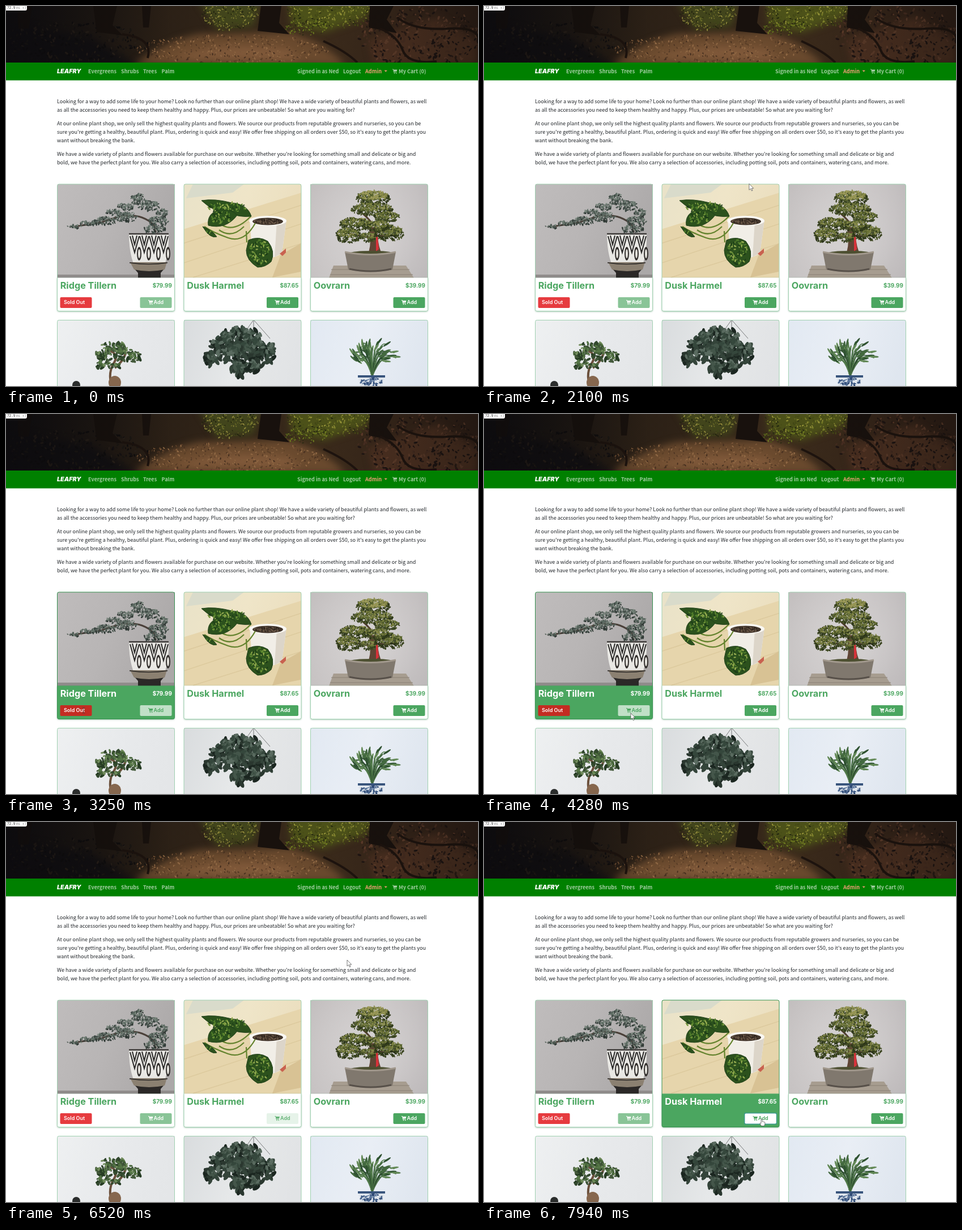
Write an HTML page with a canvas that moves like this. It is 833 px wide and 672 px high and loops after 8 s.

```html
<!DOCTYPE html>
<html lang="en">
<head>
<meta charset="utf-8">
<title>Plant shop</title>
<style>
html, body { margin: 0; width: 100%; height: 100%; overflow: hidden; background: #fff; }
canvas, svg { position: absolute; left: 0; top: 0; width: 833px; height: 672px; }
text { white-space: pre; }
.body, .nav { font: 9.08px "Noto Sans CJK SC", "Noto Sans CJK JP", "Noto Sans CJK KR", "Noto Sans CJK TC", "Noto Sans", sans-serif; fill: #212529; }
.nav { font-weight: 700; fill: #a3cfa3; }
.admin { fill: #f29d78; }
.brand { font: italic 900 10.7px Inter, sans-serif; fill: #fff; }
.badge { font: 6px "DejaVu Sans Mono", monospace; fill: #333; }
.title, .price, .btn { font-family: Inter, "Open Sans", sans-serif; font-weight: 700; }
.title { font-size: 16.2px; }
.price { font-size: 9.8px; text-anchor: end; }
.btn { font-size: 9px; font-weight: 600; }
.title, .price { fill: #4ba660; }
.panel { fill: #fff; }
.frame { fill: none; stroke: #9fd0b0; }
.sold { fill: #e63b3f; }
.on .title, .on .price { fill: #fff; }
.on .panel { fill: #4ba660; }
.on .frame { stroke: #35914f; }
.on .sold { fill: #c32c22; }
.off { opacity: .65; }
.shade { filter: drop-shadow(0 1.5px 1.5px rgba(60, 130, 85, .55)); }
</style>
</head>
<body>
<canvas id="photos" width="833" height="672"></canvas>
<svg id="page" viewBox="0 0 833 672"></svg>
<script>
const ctx = document.getElementById('photos').getContext('2d');
const page = document.getElementById('page');
const TAU = Math.PI * 2;
const CARD_X = [90.5, 314, 537.5];

// ---------- photos ----------
let seed = 7;
const rnd = () => (seed = (seed * 16807) % 2147483647) / 2147483647;
const span = (a, b) => a + (b - a) * rnd();
const pick = list => list[Math.floor(rnd() * list.length)];

function oval(x, y, rx, ry, color, turn = 0) {
  ctx.fillStyle = color;
  ctx.beginPath();
  ctx.ellipse(x, y, rx, ry, turn, 0, TAU);
  ctx.fill();
}
function shape(d, color, stroke, width = 1) {
  const p = new Path2D(d);
  if (color) { ctx.fillStyle = color; ctx.fill(p); }
  if (stroke) { ctx.strokeStyle = stroke; ctx.lineWidth = width; ctx.stroke(p); }
}
function leaves(x, y, rx, ry, n, size, colors) {
  for (let i = 0; i < n; i++) {
    const a = rnd() * TAU, r = Math.sqrt(rnd());
    const s = size * span(.6, 1.2);
    oval(x + Math.cos(a) * r * rx, y + Math.sin(a) * r * ry, s, s * .5, pick(colors), rnd() * 3);
  }
}
// Foliage tier, dark below and lit from above
function tier(x, y, rx, ry, density, size, dark, light) {
  leaves(x, y + ry * .15, rx, ry, rx * ry * density, size, dark);
  leaves(x, y - ry * .25, rx * .9, ry * .65, rx * ry * density * .6, size * .8, light);
}
function photo(x, y, w, h, stops, draw) {
  ctx.save();
  ctx.beginPath();
  ctx.rect(x, y, w, h);
  ctx.clip();
  const g = ctx.createLinearGradient(x, y, x + w, y + h * .5);
  stops.forEach((c, i) => g.addColorStop(i / (stops.length - 1), c));
  ctx.fillStyle = g;
  ctx.fillRect(x, y, w, h);
  draw();
  ctx.restore();
}

function forest() {
  ctx.filter = 'blur(7px)';
  shape('M225 105Q270 66 340 50L500 46Q560 62 600 105Z', '#6a4a2e');
  shape('M290 92Q380 62 500 76L520 96Z', '#80593a');
  shape('M340 -10H450L436 36L372 40Z', '#42451c');
  shape('M500 -10H660L630 22L560 46L505 34Z', '#4c5119');
  shape('M640 60L760 20L833 60V105H650Z', '#4a2f20');
  shape('M0 30L150 56L232 105H0Z', '#121013');
  ctx.filter = 'none';
  leaves(395, 14, 50, 30, 260, 2, ['#6a6c28', '#3f451a', '#8b853a', '#23240f']);
  leaves(575, 8, 80, 32, 380, 2, ['#6f7524', '#454a16', '#959339', '#282c10']);
  leaves(530, 38, 40, 14, 100, 2, ['#6d7a20', '#4a5319', '#2f2c15']);
  leaves(400, 76, 170, 26, 420, 2, ['#7a5638', '#5a3e27', '#8f6844', '#473020']);
  leaves(115, 66, 135, 38, 260, 3, ['#1c1814', '#0f0d0e', '#2b221b', '#161213']);
  leaves(730, 55, 110, 54, 420, 3, ['#452c20', '#291b15', '#5a3a29', '#1d1412']);
  shape('M154 0H196L188 34L206 52L160 46Z M450 0H486L482 30L500 50L444 44Z M642 0H684L672 24L690 48L640 38Z M20 0H46L40 40H22Z M240 0H256L252 38H242Z', '#18110d');
  shape('M205 50Q260 56 250 92 M660 40Q690 52 700 78T760 98 M690 20Q720 44 780 40T833 66 M560 62Q600 80 620 100', null, '#1d130e', 4);
  const g = ctx.createLinearGradient(0, 0, 833, 0);
  g.addColorStop(0, 'rgba(10,9,12,.65)');
  g.addColorStop(.35, 'rgba(10,9,7,0)');
  g.addColorStop(.75, 'rgba(10,9,7,0)');
  g.addColorStop(1, 'rgba(10,9,7,.3)');
  ctx.fillStyle = g;
  ctx.fillRect(0, 0, 833, 100);
}

function juniper() {
  shape('M90 475H298V481H90Z', '#908c8b');
  shape('M226 464H280L273 472V481H233V472Z', '#2b2827');
  shape('M217 402H287Q288 434 280 458Q252 468 226 458Q217 436 217 402Z', '#e9e8e4');
  shape('M219 453H284L280 466Q252 472 226 466Z', '#8b8071');
  shape('M218 454Q252 459 285 454', null, '#2d2a28', 1.5);
  for (let x = 219; x < 285; x += 17) {
    shape(`M${x} 407L${x + 8} 436L${x + 16} 407M${x + 4} 406L${x + 8} 422L${x + 12} 406`, null, '#2b2a29', 2);
    oval(x + 16, 438, 4, 12, '#33302e');
    oval(x + 16, 438, 2, 8, '#e5e3dd');
  }
  shape('M217 403H287', null, '#3a3735', 2.5);
  shape('M264 401Q266 384 240 374T170 382L116 391', null, '#4a4039', 3);
  const dark = ['#3d4843', '#515d56', '#2d3632'], light = ['#68766d', '#57665d', '#7d8a80'];
  [[122, 390, 14, 3], [148, 384, 18, 5], [176, 379, 20, 7], [190, 364, 13, 6], [212, 372, 20, 9], [212, 354, 16, 6], [232, 340, 13, 10], [252, 352, 19, 9], [276, 366, 11, 9], [268, 380, 18, 9], [262, 394, 20, 6]]
    .forEach(t => tier(...t, .38, 2.4, dark, light));
}

function vine() {
  shape('M312 395L522 330V480H312Z', '#e6d5ac');
  shape('M312 420L522 352M312 455L522 385M330 480L522 420', null, '#dcc99d', 1.5);
  shape('M330 315H420L400 330L318 340Z', '#d9dbcb');
  shape('M485 440L520 420V470L470 480Z', '#d8c294');
  shape('M430 376L495 378L487 437Q470 450 446 444L434 432Z', '#f1eee7');
  shape('M478 380L495 378L487 437L474 444Z', '#dcd5c9');
  oval(462, 380, 33, 9, '#faf8f3');
  oval(462, 381, 27, 6.5, '#43362c');
  leaves(462, 381, 24, 4, 50, 2, ['#2d231c', '#6d5a49']);
  shape('M494 429L483 438L488 442L494 436Z', '#c9614f');
  shape('M440 384Q420 420 392 410T350 390M420 390Q398 412 376 396M424 398L425 418M432 372Q405 400 382 388', null, '#64832e', 2.2);
  const blades = [
    ['M345 344Q368 340 398 348Q426 350 433 372Q410 374 394 366Q368 366 345 344Z', 390, 356, 34, 9],
    ['M357 388Q354 366 378 360Q400 360 408 370Q388 396 357 388Z', 380, 374, 18, 11],
    ['M428 414Q446 406 462 416Q476 434 468 452Q458 462 444 462Q424 450 424 432Z', 447, 436, 18, 22],
    ['M347 390Q364 396 372 408Q360 412 347 390Z', 360, 400, 6, 4]
  ];
  for (const [d, x, y, rx, ry] of blades) {
    shape(d, '#2c511d', '#20401a');
    leaves(x, y, rx, ry, rx * ry * .2, 2.4, ['#6f9438', '#4f7c2a', '#1c3c17', '#93a94f']);
  }
}

function bonsai() {
  const g = ctx.createRadialGradient(640, 400, 30, 640, 400, 130);
  g.addColorStop(0, 'rgba(214,211,211,.8)');
  g.addColorStop(1, 'rgba(214,211,211,0)');
  ctx.fillStyle = g;
  ctx.fillRect(537, 315, 208, 166);
  shape('M578 459H706L720 481H570Z', '#a79d90');
  shape('M574 466H712M572 475H718', null, '#8a8074');
  shape('M640 436Q646 414 640 392L656 390Q654 415 662 436Z', '#5f4535');
  shape('M646 410Q620 406 604 402M652 406Q676 408 690 404M646 384Q636 372 628 366', null, '#4d3a2c', 3);
  const dark = ['#39431f', '#4a5529', '#2b3419'], light = ['#737b3c', '#5d6932', '#8b8d4c'];
  [[648, 338, 30, 12], [646, 358, 37, 11], [672, 372, 22, 9], [616, 384, 28, 11], [604, 404, 22, 13], [640, 408, 16, 8], [676, 400, 26, 14], [654, 388, 24, 10]]
    .forEach(t => tier(...t, .6, 2.4, dark, light));
  leaves(648, 334, 26, 8, 90, 2, ['#a09d5c', '#8a8b4c']);
  shape('M653 409L656 408L658 430L653 434Z', '#d8323a');
  oval(645, 437, 38, 4, '#4c4f30');
  shape('M598 435Q644 444 688 435L682 466Q644 474 604 466Z', '#80786e');
  shape('M598 435Q644 444 688 435', null, '#a0978b', 3);
  shape('M606 465Q644 473 680 465', null, '#575049', 3);
}

function ficus() {
  shape('M186 672Q180 648 190 632T184 610M192 640Q206 630 212 612', null, '#6b503c', 4);
  oval(192, 666, 11, 12, '#86674e');
  const dark = ['#33492e', '#263c23', '#43593a'], light = ['#557546', '#466539', '#728d5c'];
  [[190, 604, 24, 11], [172, 618, 16, 10], [206, 614, 18, 12], [226, 620, 13, 10], [180, 634, 24, 7]]
    .forEach(t => tier(...t, .13, 4.4, dark, light));
  oval(124, 670, 7, 7, '#2b2d2c');
}

function hanging() {
  shape('M437 555L412 590M437 555V600M437 555L466 588', null, '#77797a');
  const dark = ['#2a372f', '#1b2620', '#34443a'], light = ['#44564a', '#35473c', '#5a6b60'];
  [[415, 584, 38, 18], [380, 596, 20, 14], [364, 620, 13, 15], [402, 612, 26, 16], [436, 606, 22, 18], [462, 612, 13, 18], [412, 640, 16, 15], [438, 636, 14, 12]]
    .forEach(t => tier(...t, .11, 6.5, dark, light));
}

function palm() {
  for (let i = 0; i < 46; i++) {
    const a = span(-2.9, -.25), r = span(22, 47);
    const x = 648 + Math.cos(a) * r, y = 630 + Math.sin(a) * r;
    shape(`M646 656Q${648 + Math.cos(a) * r * .4} ${y - 6} ${x} ${y + 7}`, null, pick(['#3a6138', '#29482c', '#527a4b']), 1.4);
    oval(x, y + 5, 8, 1.7, pick(['#43693f', '#2f5231', '#638956']), a + .4);
  }
  shape('M621 654H669L664 673H626Z', '#dfe5ec');
  shape('M621 655H669', null, '#39557d', 4);
  leaves(645, 665, 20, 7, 60, 2.4, ['#48658f', '#2f4a75', '#7f96b5']);
}

photo(0, 0, 833, 100, ['#121012', '#2b2016', '#3a2a1b', '#2e1e16'], forest);
photo(91, 315, 207, 166, ['#bfbcbc', '#b8b5b5', '#aba8a8'], juniper);
photo(314, 315, 207, 166, ['#e9e2c8', '#efe5c8', '#eaddbd'], vine);
photo(537, 315, 207, 166, ['#c2bebe', '#c8c4c4', '#bdb9ba'], bonsai);
photo(91, 555, 207, 117, ['#eef0f1', '#e8eaec', '#e4e6e8'], ficus);
photo(314, 555, 207, 117, ['#d9dcde', '#e6e8e9', '#e1e3e5'], hanging);
photo(537, 555, 207, 117, ['#e2e9f2', '#e9eef5', '#dfe6ef'], palm);

// ---------- page ----------
const text = (cls, x, y, s) => `<text class="${cls}" x="${x}" y="${y}">${s}</text>`;
const rect = (cls, x, y, w, h, r = 0, more = '') => `<rect class="${cls}" x="${x}" y="${y}" width="${w}" height="${h}" rx="${r}" ${more}/>`;
const cart = (x, y) => `<path transform="translate(${x} ${y})" d="M0 0H1.7L2.1 1H8.4L7.5 4.6H3L3.2 5.4H7.3V6.2H2.4L1.2 .9H0ZM3.4 6.5a.8.8 0 1 0 .1 0ZM6.7 6.5a.8.8 0 1 0 .1 0Z"/>`;

const lines = [
  [172, 'Looking for a way to add some life to your home? Look no further than our online plant shop! We have a wide variety of beautiful plants and flowers, as well'],
  [187.3, 'as all the accessories you need to keep them healthy and happy. Plus, our prices are unbeatable! So what are you waiting for?'],
  [211, 'At our online plant shop, we only sell the highest quality plants and flowers. We source our products from reputable growers and nurseries, so you can be'],
  [226.2, 'sure you\'re getting a healthy, beautiful plant. Plus, ordering is quick and easy! We offer free shipping on all orders over $50, so it\'s easy to get the plants you'],
  [241.3, 'want without breaking the bank.'],
  [264.7, 'We have a wide variety of plants and flowers available for purchase on our website. Whether you\'re looking for something small and delicate or big and'],
  [279.8, 'bold, we have the perfect plant for you. We also carry a selection of accessories, including potting soil, pots and containers, watering cans, and more.']
];
const links = [[145, 'Evergreens'], [203, 'Shrubs'], [242, 'Trees'], [274.5, 'Palm'], [514, 'Signed in as Ned'], [595, 'Logout'], [693, 'My Cart (0)']];
const goods = [['Ridge Tillern', '$79.99', true], ['Dusk Harmel', '$87.65'], ['Oovrarn', '$39.99']];

const card = ([name, price, sold], i) => {
  const x = CARD_X[i];
  return `<g id="card${i}">
    <path class="panel shade" d="M${x} 480.5h207v56a3 3 0 0 1-3 3h-201a3 3 0 0 1-3-3Z"/>
    ${rect('frame', x, 315, 207, 224.5, 3)}
    ${text('title', x + 5.2, 500.2, name)}${text('price', x + 202.3, 498.2, price)}
    ${sold ? rect('sold', x + 5, 515, 56, 19, 2) + `<g fill="#fff">${text('btn', x + 11.5, 527.4, 'Sold Out')}</g>` : ''}
    <g class="${sold ? 'off' : ''}">${rect('face', x + 146, 515, 56, 19, 2)}
      <g class="label">${cart(x + 160.5, 520)}${text('btn', x + 170, 527.4, 'Add')}</g></g>
  </g>`;
};

page.innerHTML =
  `<path d="M0 0H37V5a3 3 0 0 1-3 3H0Z" fill="#fff"/>` + text('badge', 2, 5.4, '72.9') +
  `<g opacity=".6">${text('badge', 18, 5.4, 'ms +)')}</g>` +
  rect('', 0, 100, 833, 31.5, 0, 'fill="#008000"') + text('brand', 90, 119.4, 'LEAFRY') +
  links.map(([x, s]) => text('nav', x, 119, s)).join('') + text('nav admin', 634, 119, 'Admin') +
  `<path d="M667.5 113.8h5.4l-2.7 2.8Z" fill="#f29d78"/><g fill="#a3cfa3">${cart(682, 111.5)}</g>` +
  lines.map(([y, s]) => text('body', 90, y, s)).join('') +
  goods.map(card).join('') +
  CARD_X.map(x => rect('frame', x, 555.5, 207, 130, 3)).join('') +
  rect('', 459.7, 514.7, 56.8, 19.6, 2.5, 'id="ring" fill="none" stroke="#3b9a8c" stroke-width="1.5"') +
  `<g id="cursor" stroke="#444" stroke-width=".7" stroke-linejoin="round">
    <path d="M0 0V11L2.6 8.6L4.4 12.6L6.1 11.9L4.4 8.1H7.8Z" fill="#fff"/>
    <path d="M-2.5 -5H-.7L0 -4.4L.7 -5H2.5M0 -4.4V4.4M-2.5 5H-.7L0 4.4L.7 5H2.5" fill="none"/>
    <path d="M-1 .8Q0 -.6 1 .8V5L2.6 4.9L4.2 5.3L5.8 6V9.2L4.6 12.4H-.5L-3.2 8.2Q-3.4 6.6 -1 8Z" fill="#fff"/>
  </g>`;

// ---------- motion ----------
const LOOP = 8000, FADE = 150;
const path = [
  [250, 818, 655], [640, 815, 330], [860, 803, 126], [1000, 742, 104], [1140, 682, 87], [1210, 682, 87],
  [1450, 662, 100], [1650, 672, 130], [1830, 686, 145], [1900, 668, 160], [2330, 240, 490], [2450, 181, 532], [2520, 181, 532],
  [2660, 162, 527], [2850, 148, 524], [3050, 148, 524], [3250, 137, 524], [3320, 137, 524], [3480, 62, 516], [3560, 62, 516],
  [3800, 150, 530], [3870, 160, 530], [4280, 259, 529], [4350, 259, 529], [4630, 272, 531], [5000, 284, 528],
  [5370, 259, 518], [6250, 259, 518], [6400, 430, 400], [6520, 602, 244], [6590, 602, 244], [6690, 716, 217],
  [6780, 640, 245], [6880, 512, 320], [7000, 488, 488], [7070, 488, 490], [7270, 490, 525], [8000, 490, 525]
];
// Times each card is under the pointer
const hovers = [
  [[2275, 3400], [3650, 6290]],
  [[2105, 2255], [6300, 6500], [6880, 9000]],
  []
];
const GREEN = [75, 166, 96], WHITE = [255, 255, 255];
const mix = (a, b, k) => `rgb(${a.map((v, i) => Math.round(v + (b[i] - v) * k))})`;
const clamp = v => Math.max(0, Math.min(1, v));
const glow = (t, [a, b]) => t < b ? clamp((t - a) / FADE) : clamp(1 - (t - b) / FADE);
const inside = (x, y, left) => x > left && x < left + 56 && y > 514 && y < 534;

const cursor = document.getElementById('cursor');
const ring = document.getElementById('ring');
const cards = CARD_X.map((_, i) => {
  const el = document.getElementById('card' + i);
  return { el, face: el.querySelector('.face'), label: el.querySelector('.label') };
});

function pointer(t) {
  const i = path.findIndex(p => p[0] > t);
  const [t0, x0, y0] = path[i - 1], [t1, x1, y1] = path[i];
  const k = (t - t0) / (t1 - t0);
  return [x0 + (x1 - x0) * k, y0 + (y1 - y0) * k];
}

function draw(t) {
  cursor.style.display = t < 250 ? 'none' : '';
  if (t >= 250) {
    const [x, y] = pointer(t);
    const kind = inside(x, y, 95.5) ? 1 : inside(x, y, 460) ? 2 : 0;
    cursor.setAttribute('transform', `translate(${x.toFixed(1)} ${y.toFixed(1)})`);
    [...cursor.children].forEach((el, i) => { el.style.display = i === kind ? '' : 'none'; });
  }
  cards.forEach(({ el, face, label }, i) => {
    const k = Math.max(0, ...hovers[i].map(h => glow(t, h)));
    el.classList.toggle('on', hovers[i].some(([a, b]) => t >= a && t < b));
    face.style.fill = mix(GREEN, WHITE, k);
    label.style.fill = mix(WHITE, GREEN, k);
  });
  ring.style.display = t >= 7890 ? '' : 'none';
}

const start = performance.now();
function tick() {
  draw((performance.now() - start) % LOOP);
  requestAnimationFrame(tick);
}
tick();
</script>
</body>
</html>
```
